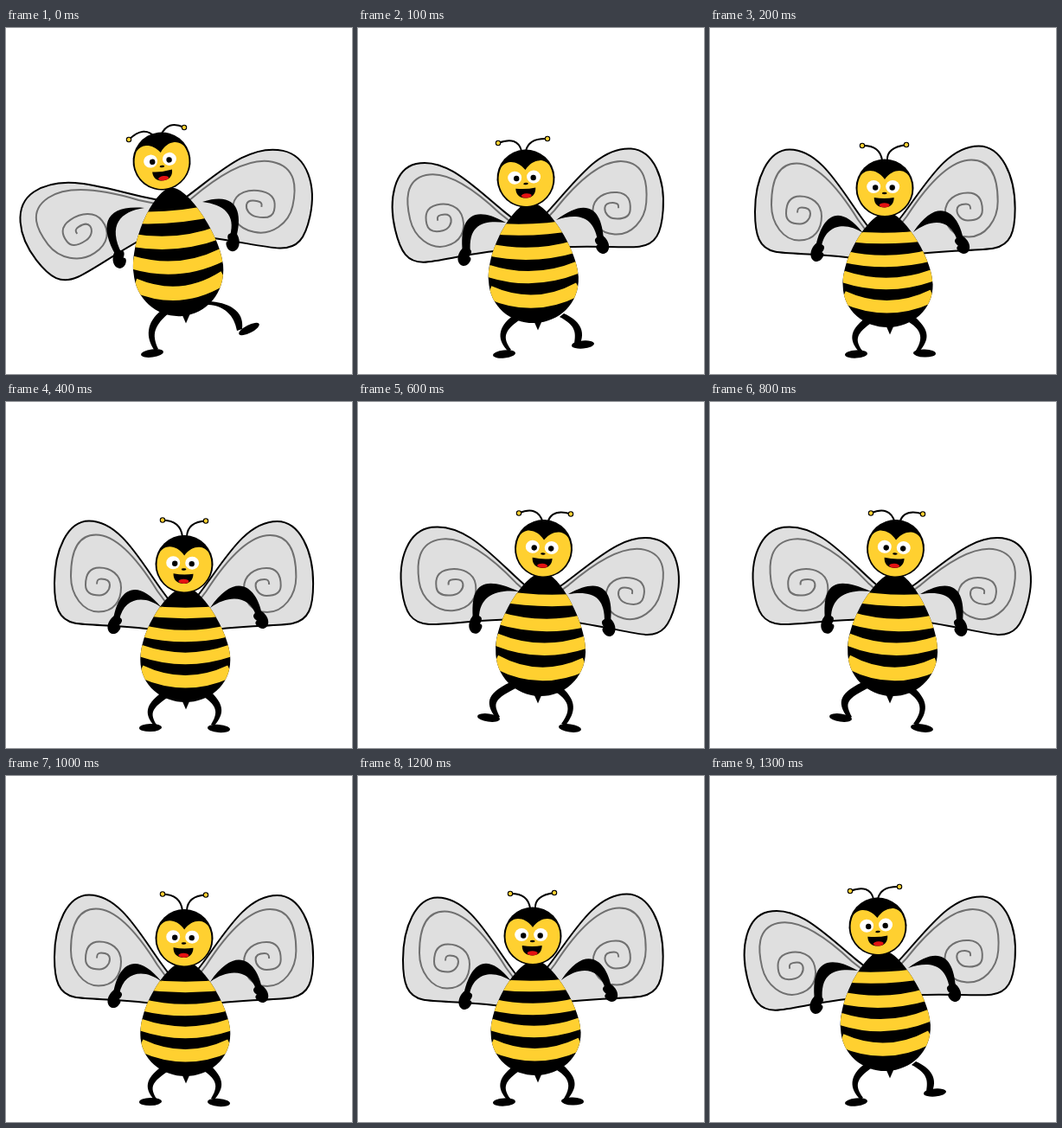
An HTML page without scripts that plays this animation: 400 by 400 pixels, repeating every 1.4 s.

```html
<!DOCTYPE html>
<html lang="en">
<head>
<meta charset="utf-8">
<title>Dancing bee</title>
<style>
html, body { margin: 0; height: 100%; overflow: hidden; background: #fff; }
svg { display: block; width: 100%; height: 100%; animation: sway 1.4s step-end infinite; }

.edge, .curl { vector-effect: non-scaling-stroke; stroke-width: 2; stroke-linejoin: round; }
.edge { fill: #dfdfdf; stroke: #000; }
.curl { fill: none; stroke: #707070; }
.wing.l { transform: var(--wing-l); }
.wing.r { transform: var(--wing-r); }

.body { translate: var(--x) var(--y); rotate: var(--lean); scale: 1 var(--tall); }
.sting { translate: 208px var(--y); }
.bands { fill: none; stroke: #ffd030; stroke-width: 13.5; }

.leg.l { d: var(--leg-l); }
.leg.r { d: var(--leg-r); }
.foot.l { transform: var(--foot-l); }
.foot.r { transform: var(--foot-r); }
.arm.l { d: var(--arm-l); marker-start: url(#hand-l); }
.arm.r { d: var(--arm-r); marker-start: url(#hand-r); }

.feelers { translate: var(--head); d: var(--feelers); fill: none; stroke: #000; stroke-width: 2;
  marker-start: url(#knob); marker-end: url(#knob); }
.head { translate: var(--head); rotate: var(--tilt); }

/* eight poses, played forth and back */
@keyframes sway {
  0%, 100% {
    --x: 204px; --y: 333px; --lean: -5deg; --tall: 1.12;
    --head: 180px 154px; --tilt: -7deg;
    --feelers: path("M-38 -25 Q-20 -42 -8 -28 L-1 -30 Q7 -48 26 -39");
    --wing-l: matrix(.95, -.64, .57, .74, 85.5, 234.5);
    --wing-r: matrix(-1.14, -.24, -.2, .92, 291, 205);
    --arm-l: path("M127 263 C107 228 114 204 160 208 C132 212 117 228 134 261Z");
    --arm-r: path("M266 243 C274 214 268 188 227 201 C252 204 266 216 259 240Z");
    --leg-l: path("M172 373 C161 358 162 340 180 326 L190 328 C171 344 168 354 176 371Z");
    --leg-r: path("M273 348 C276 326 256 317 234 316 L234 320 C252 321 264 332 267 350Z");
    --foot-l: translate(169px, 376px) rotate(-8deg);
    --foot-r: translate(281px, 348px) rotate(-27deg);
  }
  7.14%, 92.85% {
    --x: 205px; --y: 341px; --lean: -2.3deg; --tall: 1.05;
    --head: 194px 174px; --tilt: -3deg;
    --feelers: path("M-32 -41 Q-9.5 -49.5 -5 -32 L0 -32 Q3.5 -47 25 -46");
    --wing-l: matrix(1, -.23, .22, .93, 96, 221);
    --wing-r: matrix(-1.05, -.07, -.07, .95, 297, 207);
    --arm-l: path("M121 259 C117 222 130 202 171 225 C146 222 127 226 130 259Z");
    --arm-r: path("M284 245 C282 210 266 194 229 222 C252 214 272 216 277 245Z");
    --leg-l: path("M174 374 C161 362 160 346 180 332 L189 336 C168 350 167 358 177 372Z");
    --leg-r: path("M256 367 C264 350 256 338 238 330 L233 334 C252 344 252 352 250 365Z");
    --foot-l: translate(169px, 377px) rotate(-6deg);
    --foot-r: translate(260px, 366px) rotate(-5deg);
  }
  14.28%, 85.71% {
    --x: 206.3px; --y: 346px; --lean: -.8deg; --tall: 1;
    --head: 202px 185px; --tilt: 0deg;
    --feelers: path("M-26 -49 Q-5.5 -49.5 -3 -32 L3 -32 Q2 -47 25 -50");
    --wing-l: matrix(1, 0, 0, 1, 105, 212.5);
    --wing-r: matrix(-1.05, 0, 0, 1, 297, 208.5);
    --arm-l: path("M122 254 C128 222 146 198 177 237 C158 224 134 226 129 252Z");
    --arm-r: path("M293 245 C288 214 264 192 235 236 C256 220 278 220 286 246Z");
    --leg-l: path("M173 375 C161 362 160 350 180 335 L188 340 C169 353 167 360 176 373Z");
    --leg-r: path("M242 374 C254 360 254 350 238 335 L230 340 C246 350 246 360 238 373Z");
    --foot-l: translate(169px, 377px) rotate(-3deg);
    --foot-r: translate(248px, 376px) rotate(2deg);
  }
  21.42%, 78.57% {
    --x: 206.8px; --y: 346.7px; --lean: -.4deg; --tall: 1;
    --head: 204.3px 187px; --tilt: .5deg;
    --feelers: path("M-25.5 -50 Q-5 -50 -2.5 -32 L3 -32 Q3 -48 25 -50");
    --wing-l: matrix(1, 0, 0, 1, 107.5, 210.5);
    --wing-r: matrix(-1.04, 0, 0, 1, 298, 209.5);
    --arm-l: path("M123 253 C128 222 147 198 178 237 C159 223 135 226 130 252Z");
    --arm-r: path("M295 246 C289 214 265 193 236 237 C257 221 280 222 288 247Z");
    --leg-l: path("M172 375 C160 362 160 350 180 336 L188 341 C168 354 166 360 175 373Z");
    --leg-r: path("M242 374 C254 360 253 350 238 335 L230 341 C246 351 246 360 238 373Z");
    --foot-l: translate(168px, 377px) rotate(-2deg);
    --foot-r: translate(248px, 377px) rotate(3deg);
  }
  28.57%, 71.42% {
    --x: 207.3px; --y: 347px; --lean: 0deg; --tall: 1;
    --head: 206px 187.5px; --tilt: 1deg;
    --feelers: path("M-25 -51 Q-4.5 -50.5 -2 -32 L3 -32 Q4 -49 25 -50");
    --wing-l: matrix(1, 0, 0, 1, 109, 209.5);
    --wing-r: matrix(-1.04, 0, 0, 1, 300, 210);
    --arm-l: path("M124 252 C128 222 148 198 180 238 C160 222 136 226 131 252Z");
    --arm-r: path("M296 246 C290 214 266 194 236 238 C258 222 282 224 289 247Z");
    --leg-l: path("M172 375 C160 362 160 350 180 336 L188 341 C168 354 166 360 174 373Z");
    --leg-r: path("M241 374 C253 360 252 350 237 335 L229 341 C245 352 245 360 237 373Z");
    --foot-l: translate(167px, 376.5px) rotate(-2deg);
    --foot-r: translate(246px, 377.5px) rotate(4deg);
  }
  35.71%, 64.28% {
    --x: 208.2px; --y: 344px; --lean: .8deg; --tall: 1.03;
    --head: 209.5px 179px; --tilt: 2deg;
    --feelers: path("M-26.5 -47 Q-6 -51 -1.5 -32 L4 -32 Q7 -48 28 -46");
    --wing-l: matrix(1.05, -.07, .06, .97, 109, 209);
    --wing-r: matrix(-1.04, -.11, -.11, .96, 305, 214);
    --arm-l: path("M128 252 C128 218 144 198 183 229 C160 219 138 225 135 251Z");
    --arm-r: path("M295 250 C294 216 274 196 240 230 C264 220 284 224 288 251Z");
    --leg-l: path("M167 371 C155 357 153 345 178 331 L187 336 C162 349 161 355 170 369Z");
    --leg-r: path("M241 374 C253 359 253 348 237 333 L229 338 C246 349 246 359 236 373Z");
    --foot-l: translate(159px, 372px) rotate(3deg);
    --foot-r: translate(246px, 377.5px) rotate(6deg);
  }
  42.85%, 57.14% {
    --x: 209.5px; --y: 340px; --lean: 1.8deg; --tall: 1.075;
    --head: 214.5px 169.5px; --tilt: 3deg;
    --feelers: path("M-28.5 -41 Q-7 -50 -1 -31 L5 -31 Q10 -46.5 31.5 -40");
    --wing-l: matrix(1.1, -.14, .13, .93, 109, 210);
    --wing-r: matrix(-1.02, -.25, -.24, .9, 313, 220);
    --arm-l: path("M133 252 C130 214 140 198 186 219 C160 216 140 224 140 250Z");
    --arm-r: path("M292 255 C296 218 282 200 243 222 C270 218 286 224 285 255Z");
    --leg-l: path("M160 366 C148 350 146 338 176 324 L186 329 C156 344 156 348 164 364Z");
    --leg-r: path("M240 374 C252 358 253 346 236 330 L228 335 C246 346 246 358 235 372Z");
    --foot-l: translate(151px, 365px) rotate(8deg);
    --foot-r: translate(245px, 377px) rotate(8deg);
  }
  50% {
    --x: 211px; --y: 333px; --lean: 4deg; --tall: 1.11;
    --head: 224px 156px; --tilt: 7deg;
    --feelers: path("M-26 -39 Q-7 -48 1 -30 L8 -28 Q20 -42 38 -25");
    --wing-l: matrix(1.14, -.22, .2, .92, 108, 214);
    --wing-r: matrix(-.95, -.62, -.55, .74, 318.5, 234);
    --arm-l: path("M148 246 C140 214 144 192 190 205 C160 206 150 218 155 244Z");
    --arm-r: path("M287 260 C307 226 298 202 252 207 C280 210 296 226 280 259Z");
    --leg-l: path("M137 347 C134 326 154 318 176 317 L176 321 C158 322 146 332 143 349Z");
    --leg-r: path("M241 373 C252 356 250 342 234 326 L226 328 C244 344 245 358 235 371Z");
    --foot-l: translate(129px, 348px) rotate(24deg);
    --foot-r: translate(244px, 376px) rotate(8deg);
  }
}
</style>
</head>
<body>
<svg viewBox="0 0 400 400">
  <defs>
    <path id="egg" d="M0 -133 C-19 -133 -52 -85 -52 -49 C-52 -19 -27 0 0 0 S52 -19 52 -49 S19 -133 0 -133Z"/>
    <clipPath id="shell"><use href="#egg"/></clipPath>
    <g id="wing">
      <path class="edge" d="M85 27 L71 8 C45 -28 22 -72 -13 -72 C-38 -72 -53 -38 -53 0 C-53 28 -48 42 -30 46 C-10 50 30 47 75 56"/>
      <path class="curl" d="M80 28 L66 9 C45 -25 20 -56 -5 -56 S-34 -30 -34 -8 S-20 33 -2 33 S24 20 24 5 S12 -18 -1 -18 S-17 -8 -17 2 S-8 14 -1 14 S11 8 11 2 S5 -5 1 -5 S-4 -3 -4 1"/>
    </g>
    <path id="fist" d="M3 0 C1 -15 -13 -16 -14 -6 C-14 0 -12 2 -9 1 C-9 4 -8 8 -5 8 C-1 8 2 6 3 4Z"/>
    <marker id="hand-l" markerUnits="userSpaceOnUse" orient="auto" overflow="visible"><use href="#fist"/></marker>
    <marker id="hand-r" markerUnits="userSpaceOnUse" orient="auto" overflow="visible"><use href="#fist" transform="scale(1 -1)"/></marker>
    <marker id="knob" markerUnits="userSpaceOnUse" overflow="visible">
      <circle r="2.7" fill="#ffd030" stroke="#000" stroke-width="1.1"/>
    </marker>
  </defs>

  <g class="wing l"><use href="#wing"/></g>
  <g class="wing r"><use href="#wing"/></g>

  <path class="leg l"/>
  <path class="leg r"/>
  <ellipse class="foot l" rx="13" ry="4.6"/>
  <ellipse class="foot r" rx="13" ry="4.6"/>

  <path class="sting" d="M-5 -3 L5 -3 L0 8.5Z"/>
  <g class="body">
    <use href="#egg"/>
    <g class="bands" clip-path="url(#shell)">
      <path d="M-52 -106.5 Q0 -99.5 52 -106.5" stroke-width="12.5"/>
      <path d="M-52 -83 Q0 -70 52 -83"/>
      <path d="M-52 -59.5 Q0 -41.5 52 -59.5"/>
      <path d="M-52 -36 Q0 -11.5 52 -36" stroke-width="14.5"/>
    </g>
  </g>

  <path class="arm l"/>
  <path class="arm r"/>

  <path class="feelers"/>
  <g class="head">
    <circle r="33.5"/>
    <path fill="#ffd030" d="M0 -10 C-5 -17 -11 -20 -17 -20 C-22 -20 -26 -17 -28 -14 A31.5 31.5 0 1 0 28 -14 C26 -17 22 -20 17 -20 C11 -20 5 -17 0 -10Z"/>
    <g transform="translate(-.3 -1)">
      <g fill="#fff">
        <ellipse cx="-12.5" cy="-.5" rx="8" ry="7.5"/>
        <ellipse cx="9.5" cy="-.5" rx="8" ry="7.5"/>
      </g>
      <circle cx="-10.5" cy=".5" r="3.2"/>
      <circle cx="9" cy=".5" r="3.2"/>
      <ellipse cy="7" rx="2.8" ry="1.2"/>
      <path d="M-12 12 Q0 14 11 12 C11 20 6 23.5 0 23.5 C-7 23.5 -12 20 -12 12Z"/>
      <ellipse cy="20.8" rx="6" ry="2.6" fill="#e31212"/>
    </g>
  </g>
</svg>
</body>
</html>
```
